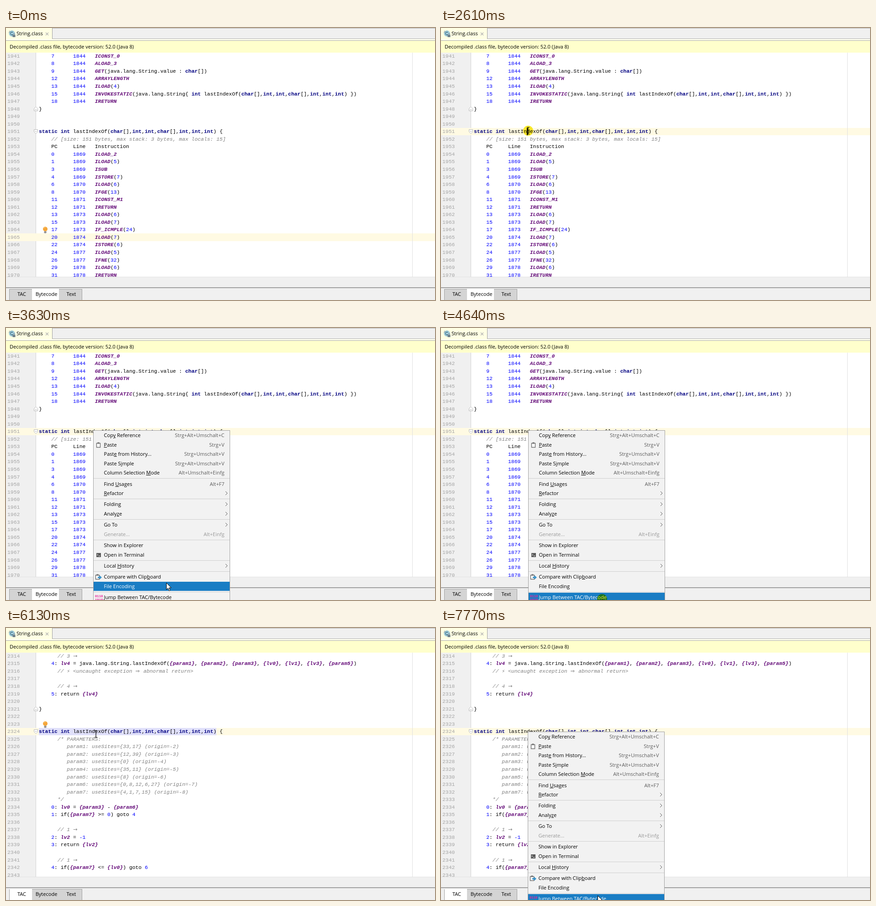
An HTML page that plays this animation: 940x596 px, repeating every 8 s.

```html
<!DOCTYPE html>
<html lang="en">
<head>
<meta charset="utf-8">
<title>Bytecode viewer</title>
<style>
html, body { margin: 0; width: 100%; height: 100%; overflow: hidden; }
#stage { position: relative; width: 940px; height: 596px; overflow: hidden; background: #f0f0f0;
  font: 11.05px/16px "Open Sans", "Noto Sans", sans-serif; color: #000; }
:where(#stage div, #stage svg, #stage pre) { position: absolute; left: 0; top: 0; box-sizing: border-box; margin: 0; white-space: pre; }
#stage [hidden] { display: none; }
svg { overflow: visible; }
#bar { width: 940px; height: 28px; border-top: 1px solid #b4b4b4; border-bottom: 1px solid #aaa; }
#strip { top: 23px; width: 940px; height: 4px; background: #fffff0; border-top: 1px solid #b0b0b0; }
#file { width: 102px; height: 24px; background: #ffffe4; border-right: 1px solid #a0a0a0; padding: 4px 0 0 23px; }
#banner { top: 28px; width: 940px; height: 26px; background: #ffffcc; padding: 5px 8px; }
#editor { top: 54px; width: 940px; height: 492px; overflow: hidden; background: #fff; border-bottom: 1px solid #e2e2e2; }
#gutter { width: 66px; height: 492px; background: #f0f0f0; border-right: 1px solid #d4d4d4; }
#margin { left: 890px; width: 1px; height: 492px; background: #e0e0e0; }
#row { width: 940px; height: 16.6px; background: #fffae3; }
#sel { left: 72px; top: 164.5px; width: 389px; height: 16.6px; background: #e0e0fa; }
#caret { top: 164.5px; width: 2px; height: 16.5px; background: #000; }
pre { font: 11.38px/16.55px "Courier New", "Liberation Mono", monospace; }
pre.code { left: 71.9px; top: -.2px; }
pre.nums { left: 3px; top: -.2px; color: #a5a5a5; }
pre b { color: #000080; }
pre .op { font-style: italic; color: #660e7a; }
pre i { font-style: normal; color: #00f; }
pre em { color: #808080; }
pre s { display: inline-block; width: 10.8px; height: 12px; line-height: 12px; text-decoration: none;
  font-family: "DejaVu Sans", sans-serif; }
pre s.bolt { width: 6.83px; font-size: 10px; }
#folds { left: 61px; }
#tabs { top: 568px; width: 940px; height: 28px; border-top: 2px solid #a0a0a0; }
#tabs div { top: 2px; height: 26px; padding: 2px 0 0 4px; text-align: center; background: #d4d4d4;
  border: solid #a0a0a0; border-width: 1px 1px 0 0; }
#tabs div:first-child { border-left-width: 1px; }
#tabs div.on { background: #fff; border-top-color: #fff; }
#menu { width: 300px; height: 400px; background: #f2f2f2; border: 1px solid #a0a0a0; }
#menu .item { width: 298px; height: 20.5px; line-height: 20.5px; padding-left: 23px; }
#menu .key { left: auto; right: 11px; color: #5c5c5c; }
#menu .off, #menu .off .key { color: #999; }
#menu .hot, #menu .hot .key { background: #1a7dc4; color: #fff; }
#menu .sep { width: 298px; height: 1px; background: #cfcfcf; }
#menu svg { left: 2px; top: 2px; }
#menu svg.more { left: 287px; top: 5px; }
#menu u { text-underline-offset: 1px; }
#halo { width: 22px; height: 22px; margin: -11px 0 0 -11px; border-radius: 50%; background: #f8ea30; mix-blend-mode: multiply; }
</style>
</head>
<body>
<div id="stage">
  <div id="bar"></div><div id="strip"></div>
  <div id="file">String.class</div>
  <svg width="102" height="26" fill="none">
    <circle cx="13" cy="12" r="6" fill="#a9d3e3" stroke="#7fb4c8"/>
    <path d="M15.2 10A3 3 0 1 0 15.2 14" stroke="#3d6a7c" stroke-width="1.3"/>
    <path d="M7 6l3 3M6 9l2 1" stroke="#6d7d86"/>
    <rect x="14.5" y="15" width="6" height="5" fill="#70808a"/>
    <path d="M15.8 15v-1.5a1.7 1.7 0 0 1 3.4 0V15" stroke="#70808a"/>
    <path d="M87 10l6 6M93 10l-6 6" stroke="#b0b0b0" stroke-width="1.2"/>
  </svg>
  <div id="banner">Decompiled .class file, bytecode version: 52.0 (Java 8)</div>
  <div id="editor">
    <div id="gutter"></div>
    <div id="row"></div><div id="sel"></div><div id="margin"></div>
    <div id="byte"></div><div id="tac"></div>
    <div id="caret"></div>
    <svg id="folds" width="10" height="200" fill="#fff" stroke="#b8b8b8">
      <path d="M.5 122.5L4.5 118.5L8.5 122.5V127.5H.5ZM2.5 124.5h4M.5 168.5h8v5l-4 4l-4-4ZM2.5 172.5h4"/>
    </svg>
    <svg id="bulb" width="14" height="16">
      <circle cx="7" cy="5.5" r="5" fill="#f4a63a"/>
      <path d="M4.3 3.8a3 3 0 0 1 3-1.7" stroke="#ffdd9c" fill="none"/>
      <path d="M4.5 10.5h5v3l-1 1h-3l-1-1Z" fill="#7a7a7a"/><path d="M4.5 12.5h5" stroke="#ccc" stroke-width=".7"/>
    </svg>
  </div>
  <div id="tabs"></div>
  <div id="menu"></div>
  <div id="halo"></div>
  <svg id="arrow" width="12" height="19"><path d="M.5 .5V15.3L3.9 12.1L6.4 17.9L8.7 16.9L6.3 11.2H11Z" fill="#fff" stroke="#000"/></svg>
  <svg id="beam" width="8" height="16"><path d="M-3 -7.5h2.5l.5 .5l.5-.5h2.5M0-7V7M-3 7.5h2.5l.5-.5l.5 .5h2.5" fill="none" stroke="#000" stroke-width="1.2"/></svg>
</div>
<script>
const $ = id => document.getElementById(id);
const show = (id, v) => $(id).toggleAttribute('hidden', !v);
const place = (id, x, y) => { $(id).style.left = x + 'px'; $(id).style.top = y + 'px'; };

const SIG = 'static int lastIndexOf(char[],int,int,char[],int,int,int) {';
const ROW = 16.55;

const ops = text => text.trim().split('\n').map(l => {
  const [pc, line, ...op] = l.trim().split(' ');
  return '    ' + pc.padEnd(7) + line.padEnd(7) + op.join(' ');
});

const bytecode = [
  ...ops(`7 1844 ICONST_0
    8 1844 ALOAD_3
    9 1844 GET(java.lang.String.value : char[])
    12 1844 ARRAYLENGTH
    13 1844 ILOAD(4)
    15 1844 INVOKESTATIC(java.lang.String{ int lastIndexOf(char[],int,int,char[],int,int,int) })
    18 1844 IRETURN`),
  '}', '', '', SIG,
  '    // [size: 151 bytes, max stack: 3 bytes, max locals: 15]',
  '    PC     Line   Instruction',
  ...ops(`0 1869 ILOAD_2
    1 1869 ILOAD(5)
    3 1869 ISUB
    4 1869 ISTORE(7)
    6 1870 ILOAD(6)
    8 1870 IFGE(13)
    11 1871 ICONST_M1
    12 1871 IRETURN
    13 1873 ILOAD(6)
    15 1873 ILOAD(7)
    17 1873 IF_ICMPLE(24)
    20 1874 ILOAD(7)
    22 1874 ISTORE(6)
    24 1877 ILOAD(5)
    26 1877 IFNE(32)
    29 1878 ILOAD(6)
    31 1878 IRETURN`)
];

const sites = ['33,17', '12,39', '0', '35,11', '8', '0,8,12,6,27', '4,1,7,15'];
const tac = [
  '      // 3 →',
  '    4: lv4 = java.lang.String.lastIndexOf({param1}, {param2}, {param3}, {lv0}, {lv1}, {lv3}, {param5})',
  '      // ⚡ <uncaught exception ⇒ abnormal return>',
  '', '      // 4 →', '    5: return {lv4}', '', '}', '', '', SIG,
  '      /* PARAMETERS:',
  ...sites.map((s, i) => `         param${i + 1}: useSites={${s}} (origin=-${i + 2})`),
  '      */',
  '    0: lv0 = {param3} - {param6}',
  '    1: if({param7} >= 0) goto 4',
  '', '      // 1 →', '    2: lv2 = -1', '    3: return {lv2}',
  '', '      // 1 →', '    4: if({param7} <= {lv0}) goto 6', ''
];

function paint(line) {
  const s = line.replace(/</g, '&lt;');
  if (/^\s*(\/|\*|param)/.test(s))
    return `<em>${s.replace(/[→⇒]/g, '<s>$&</s>').replace('⚡', '<s class="bolt">⚡\uFE0E</s>')}</em>`;
  return s.replace(/(\{\w+\}|\blv\d\b|\b(?!PC)[A-Z]{2}\w*)|\b(static|int|char)\b|-?\b\d+\b/g,
    (m, op, key) => op ? `<b class="op">${m}</b>` : key ? `<b>${m}</b>` : `<i>${m}</i>`);
}

function fill(id, lines, first) {
  $(id).innerHTML = `<pre class="nums">${lines.map((_, i) => first + i).join('\n')}</pre>` +
    `<pre class="code">${lines.map(paint).join('\n')}</pre>`;
}
fill('byte', bytecode, 1941);
fill('tac', tac, 2314);

$('tabs').innerHTML = [['TAC', 7, 51], ['Bytecode', 57, 60], ['Text', 116, 51]].map(([name, x, w]) =>
  `<div style="left:${x}px;width:${w}px">${name}</div>`).join('');
const [tacTab, byteTab] = $('tabs').children;

const board = '<path d="M4.5 4.5h8v9h-8Z" fill="#fff" stroke="#6e6e6e" stroke-width="1.4"/><path d="M6.5 2.5h4v3h-4Z" fill="#6e6e6e"/>';
const icons = {
  '_Paste': board,
  'Open in Terminal': '<path d="M4 4h10v9H4Z" fill="#5a5a5a"/><path d="M5.5 6l2 2l-2 2M9 10.5h3" fill="none" stroke="#fff"/>',
  'Compare with Clip_board': '<g transform="translate(-2)">' + board + '</g><path d="M7 8h4V5l5 4.5l-5 4.5v-3H7Z" fill="#3a95cc"/>',
  'Jump Between TAC/Bytecode': '<text x="1" y="8" font-family="Liberation Mono, monospace" font-weight="bold" font-size="7.2" fill="#e8259b">0110<tspan x="1" y="16">1010</tspan></text>'
};
const entries = `Cop_y Reference|Strg+Alt+Umschalt+C
_Paste|Strg+V
Past_e from History...|Strg+Umschalt+V
Paste S_imple|Strg+Alt+Umschalt+V
Column Selection _Mode|Alt+Umschalt+Einfg
-
Find _Usages|Alt+F7
_Refactor|>
-
Folding|>
Analy_ze|>
-
Go To|>
Generate...|Alt+Einfg
-
Show in Explorer
Open in Terminal
-
Local _History|>
-
Compare with Clip_board
File Encoding
-
Jump Between TAC/Bytecode`.split('\n');

const items = [];
let itemY = .3;
for (const entry of entries) {
  const el = document.createElement('div');
  const sep = entry === '-';
  el.className = sep ? 'sep' : 'item';
  el.style.top = itemY + (sep ? 1.6 : 0) + 'px';
  if (!sep) {
    const [name, key] = entry.split('|');
    const icon = icons[name];
    el.innerHTML = (icon ? `<svg width="17" height="17">${icon}</svg>` : '') +
      name.replace(/_(.)/, '<u>$1</u>') +
      (key === '>' ? '<svg class="more" width="8" height="10"><path d="M2 1l4 4l-4 4" fill="none" stroke="#555"/></svg>'
        : key ? `<div class="key">${key}</div>` : '');
    if (name === 'Generate...') el.classList.add('off');
    else items.push({ el, y: itemY + 1 });
  }
  $('menu').append(el);
  itemY += sep ? 3.8 : 20.5;
}

// Pointer moves: start, number of 78 ms steps, target x and y, ease-out power
const STEP = 78;
const moves = [
  [590, 11, 253, 275, 1], [1450, 10, 191, 225, 1.6],
  [3160, 6, 351, 558, 1.5], [3710, 4, 353, 586, 1.2], [4030, 2, 353, 594, 1],
  [5570, 8, 197, 232, 1.5], [6190, 2, 190, 227, 1],
  [6910, 2, 289, 354, 1], [7070, 9, 342, 584, 1.6], [7770, 1, 343, 586, 1]
];

function pointer(t) {
  let x = 882, y = 606;
  for (const [start, n, tx, ty, pow] of moves) {
    if (t < start) break;
    const k = Math.min(n, Math.floor((t - start) / STEP) + 1);
    const u = 1 - (1 - k / n) ** pow;
    x += (tx - x) * u;
    y += (ty - y) * u;
  }
  return [x, y];
}

const within = (t, ...spans) => spans.some(([a, b]) => t >= a && t < b);

function draw(t) {
  const [x, y] = pointer(t);
  const isTac = t >= 4810;
  const menu = within(t, [2695, 4725], [6675, 8000]);
  const second = t > 5000;
  const menuY = second ? 227 : 224;

  show('byte', !isTac);
  show('tac', isTac);
  tacTab.classList.toggle('on', isTac);
  byteTab.classList.toggle('on', !isTac);

  place('row', 0, (t < 2610 ? 24 : 10) * ROW - 1);
  show('sel', within(t, [5190, 6590]));
  show('caret', within(t, [2610, 2695], [4810, 5570], [6440, 6590]));
  $('caret').style.left = (isTac ? 72 : 187.5) + 'px';
  show('bulb', within(t, [0, 2610], [5650, 6440]));
  place('bulb', 78.5, isTac ? 149.5 : 381);

  show('menu', menu);
  place('menu', second ? 189.5 : 190.5, menuY);
  const dy = y - menuY;
  for (const { el, y: top } of items)
    el.classList.toggle('hot', dy >= top && dy < top + 20.5);

  const beam = !menu && x > 66 && y > 54 && y < 546;
  show('beam', t >= 590 && beam);
  show('arrow', t >= 590 && !beam);
  place('beam', x, y);
  place('arrow', x - .5, y - .5);
  show('halo', within(t, [2610, 2780], [4640, 4810], [6440, 6760]));
  place('halo', x, y - .5);
}

let origin;
function tick(now) {
  origin ??= now;
  draw((now - origin) % 8000);
  requestAnimationFrame(tick);
}
draw(0);
requestAnimationFrame(tick);
</script>
</body>
</html>
```
